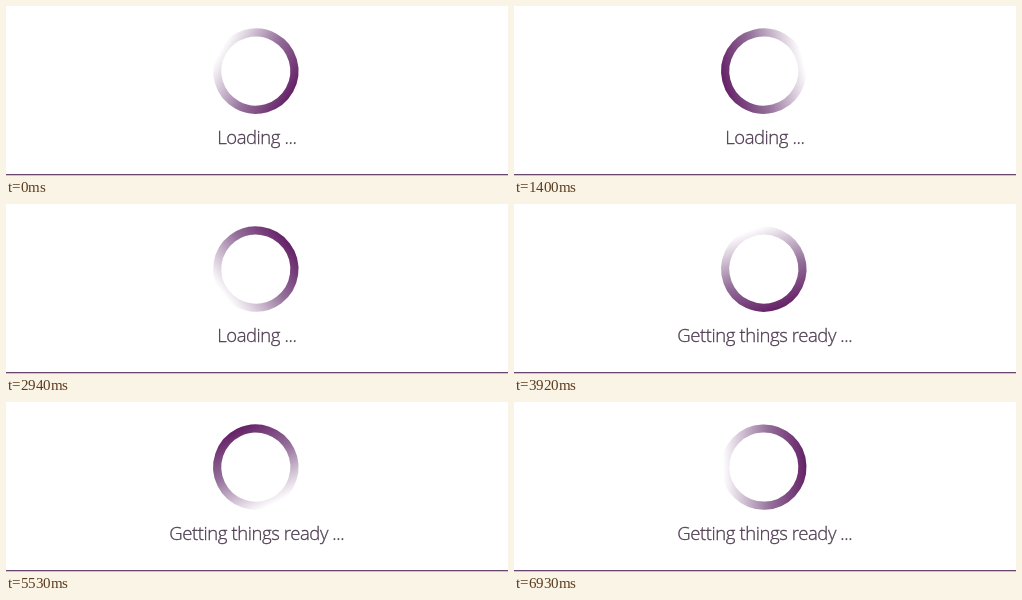
An HTML page for the animation above (7000 ms loop, 502 by 170 pixels).

```html
<!DOCTYPE html>
<html lang="en">
<head>
<meta charset="utf-8">
<title>Loading</title>
<style>
  html, body { margin: 0; width: 100%; height: 100%; overflow: hidden; background: #fff; }
  svg { display: block; }
  text {
    font: 300 18.5px "Open Sans", "Noto Sans", sans-serif;
    letter-spacing: -.42px;
    text-anchor: middle;
    fill: #4f3d52;
    stroke: #4f3d52;
    stroke-width: .3px;
  }
</style>
</head>
<body>
<svg width="502" height="170" viewBox="0 0 502 170">
  <defs>
    <linearGradient id="fade" gradientUnits="userSpaceOnUse" x1="0" y1="-41" x2="0" y2="43">
      <stop offset="0" stop-color="#fff"/>
      <stop offset=".55" stop-color="#94709a"/>
      <stop offset="1" stop-color="#642066"/>
    </linearGradient>
  </defs>
  <g transform="translate(249.8 65.1)">
    <circle id="ring" r="38.6" fill="none" stroke="url(#fade)" stroke-width="8.2"/>
  </g>
  <text id="label" x="250.8" y="137.6"></text>
  <rect y="168.1" width="502" height="1.2" fill="#5a3260"/>
</svg>
<script>
  const STEP = 70, STEPS = 100, SWITCH = 54;
  const ring = document.getElementById('ring');
  const label = document.getElementById('label');

  // [step, angle of the white side in degrees, clockwise from the top]
  const loadingTurn = [[0, 299], [20, 796], [42, 1313], [54, 1601]];
  const readyTurn = [[54, 293], [56, 340], [70, 664], [87, 1060], [100, 1372]];

  function angleAt(points, step) {
    const i = points.findIndex(([end], n) => n > 0 && step <= end);
    const [s0, a0] = points[i - 1], [s1, a1] = points[i];
    return a0 + (a1 - a0) * (step - s0) / (s1 - s0);
  }

  function draw() {
    const step = Math.floor(performance.now() / STEP) % STEPS;
    const loading = step < SWITCH;
    const angle = angleAt(loading ? loadingTurn : readyTurn, step);
    ring.setAttribute('transform', `rotate(${angle})`);
    label.textContent = loading ? 'Loading ...' : 'Getting things ready ...';
    requestAnimationFrame(draw);
  }
  draw();
</script>
</body>
</html>
```
